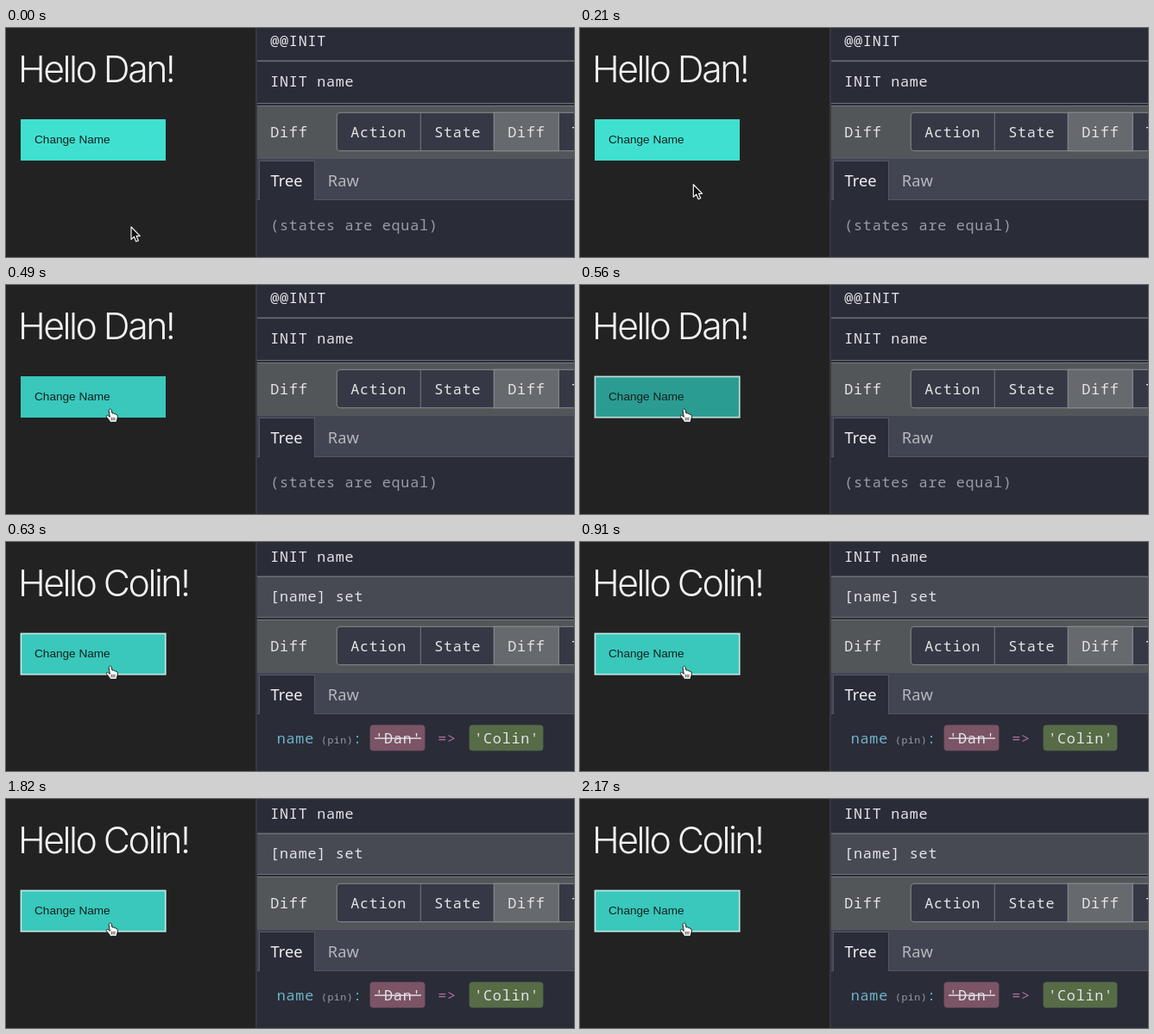
Write an HTML page that moves like this. It is 658x266 px and loops after 2240 ms.

```html
<!DOCTYPE html>
<html lang="en">
<head>
<meta charset="utf-8">
<title>Change Name</title>
<style>
  html, body { margin: 0; width: 100%; height: 100%; overflow: hidden; background: #222; }
  svg { display: block; width: 100vw; height: 100vh; }
  text { white-space: pre; }
  .hello { font: 300 42.8px Inter, Roboto, sans-serif; font-optical-sizing: none; letter-spacing: -2.5px; fill: #f2f2f2; }
  .label { font: 13.6px "Liberation Sans", Arial, sans-serif; fill: #14201f; }
  .mono { font: 500 16.8px "Noto Sans Mono", "DejaVu Sans Mono", monospace; letter-spacing: .72px; fill: #e4e4e7; }
  .small { font-size: 11.6px; letter-spacing: .45px; }
  .tab { font: 18.3px "Noto Sans", "Open Sans", sans-serif; fill: #efeff1; }
  .raw { fill: #b6b8bd; }
  .dim { fill: #9a9ca3; }
  .key { fill: #6fb4c8; }
  .arrow { fill: #b0709c; }
</style>
</head>
<body>
<svg viewBox="0 0 658 266" preserveAspectRatio="none">
  <rect width="658" height="266" fill="#222"/>
  <text id="hello" class="hello" x="14" y="63"></text>
  <rect id="button" x="17" y="106" width="168" height="48"/>
  <rect id="focus" x="17.4" y="106.4" width="167.4" height="47.4" fill="none" stroke="#e6f8f5" stroke-width="1.8" stroke-opacity=".75"/>
  <text class="label" x="33" y="134">Change Name</text>

  <rect x="289.4" width="1.3" height="266" fill="#4a4b50"/>
  <rect x="290.7" width="368" height="266" fill="#2a2c38"/>

  <g id="before">
    <rect x="291" y="37.5" width="367" height="1.6" fill="#6c6e74"/>
    <text class="mono" x="306.3" y="21">@@INIT</text>
    <text class="mono" x="306.3" y="68">INIT name</text>
    <text class="mono dim" x="306.3" y="235">(states are equal)</text>
  </g>

  <g id="after">
    <rect x="291" y="40" width="367" height="48" fill="#474a53"/>
    <rect x="291" y="39.4" width="367" height="1.6" fill="#6c6e74"/>
    <text class="mono" x="306.3" y="23">INIT name</text>
    <text class="mono" x="306.3" y="69">[name] set</text>
    <text class="mono key" x="313.8" y="234">name</text>
    <text class="mono small dim" x="365" y="234">(pin)</text>
    <text class="mono key" x="402" y="234">:</text>
    <rect x="421.6" y="212.6" width="63.8" height="29.8" rx="4" fill="#7b5466"/>
    <text class="mono" x="427.3" y="234">'Dan'</text>
    <rect x="427" y="227.3" width="54" height="1.4" fill="#e4e4e7"/>
    <text class="mono arrow" x="500.3" y="234">=&gt;</text>
    <rect x="536.6" y="212.6" width="85.8" height="29.8" rx="4" fill="#566b46"/>
    <text class="mono" x="542.3" y="234">'Colin'</text>
  </g>

  <rect x="291" y="87" width="367" height="1.2" fill="#6c6e74"/>
  <rect x="291" y="88.2" width="367" height="1.8" fill="#2a2c38"/>
  <rect x="291" y="90" width="367" height="62" fill="#535659"/>
  <rect x="291" y="90" width="367" height="1" fill="#74777c"/>
  <text class="mono" x="306.3" y="127">Diff</text>
  <rect x="383.3" y="98.3" width="320" height="44.4" rx="4" fill="#363945"/>
  <path d="M480.3 99v43" stroke="#74777c"/>
  <rect x="383.3" y="98.3" width="320" height="44.4" rx="4" fill="none" stroke="#7a7d82" stroke-width="1.2"/>
  <rect x="565.3" y="98.3" width="75" height="44.4" fill="#66696e" stroke="#85888c" stroke-width="1.2"/>
  <text class="mono" x="399.3" y="127">Action</text>
  <text class="mono" x="496.3" y="127">State</text>
  <text class="mono" x="581.3" y="127">Diff</text>
  <text class="mono" x="655.3" y="127">Trace</text>

  <rect x="291" y="152" width="367" height="48" fill="#414451"/>
  <path d="M291 151.5h367M291 199.5h367" stroke="#555863"/>
  <rect x="293.5" y="154.5" width="64" height="45" fill="#2a2c38" stroke="#555863"/>
  <rect x="294" y="198" width="63" height="2" fill="#2a2c38"/>
  <text class="tab" x="306.5" y="184">Tree</text>
  <text class="tab raw" x="372.8" y="184">Raw</text>

  <g id="cursor">
    <path id="pointer" d="M0 0V14.6L3.4 11.5L5.7 17L8.4 15.9L6.1 10.6H10.3Z" fill="#111" stroke="#f2f2f2" stroke-width="1.2" stroke-linejoin="round"/>
    <g id="hand" transform="scale(.94)" stroke="#111" stroke-linejoin="round" stroke-linecap="round">
      <path d="M-2 1.6C-2-.8 1-.8 1.4 1.6L2.2 5.2C3.4 4.4 4.7 4.9 5 6C6.1 5.4 7.1 5.9 7.3 7C8.6 6.7 9.2 7.6 9 9L8.4 12L7.4 16H-.6L-1.2 14L-4.6 10C-6 8-4 6.8-2.6 8L-1 9.3Z" fill="#fff"/>
      <path d="M1.3 10.5v3M3.3 10.5v3M5.3 10.5v3" fill="none" stroke-width=".8"/>
    </g>
  </g>
</svg>
<script>
  const LOOP = 2240, STEP = 70;
  const MOVE_END = 385, PRESS = 560, RELEASE = 630;
  const from = [145, 231], to = [121, 144.3];
  const $ = id => document.getElementById(id);
  const show = (id, on) => $(id).setAttribute('visibility', on ? 'visible' : 'hidden');
  const ease = p => p * p * (3 - 2 * p);

  function draw(time) {
    const t = Math.floor((time % LOOP) / STEP) * STEP;
    const p = ease(Math.min(1, t / MOVE_END));
    const [x, y] = from.map((a, i) => a + (to[i] - a) * p);
    const hover = y < 154, pressed = t >= PRESS && t < RELEASE, done = t >= RELEASE;

    $('cursor').setAttribute('transform', `translate(${x} ${y})`);
    show('pointer', !hover);
    show('hand', hover);
    show('focus', t >= PRESS);
    show('before', !done);
    show('after', done);
    $('button').setAttribute('fill', pressed ? '#2b9c92' : hover ? '#39c8bb' : '#40e0d0');
    $('hello').textContent = `Hello ${done ? 'Colin' : 'Dan'}!`;
  }

  const start = performance.now();
  function tick() {
    draw(performance.now() - start);
    requestAnimationFrame(tick);
  }
  tick();
</script>
</body>
</html>
```
